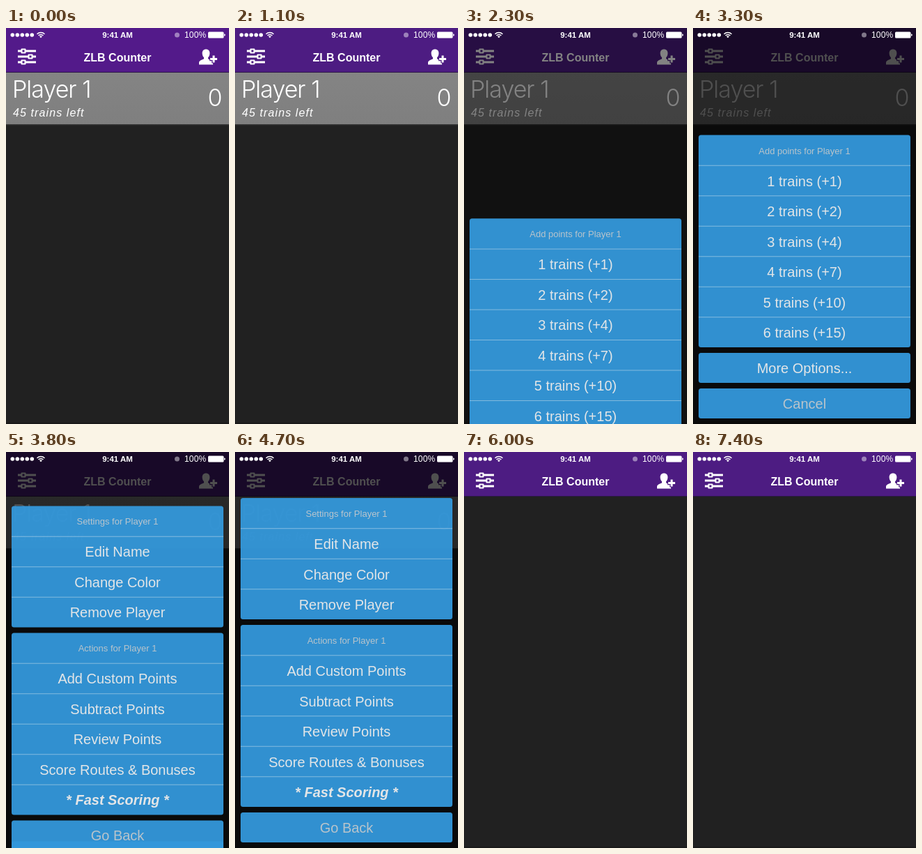
Write an HTML page that moves like this. It is 320x568 px and loops after 7600 ms.

```html
<!DOCTYPE html>
<html lang="en">
<head>
<meta charset="utf-8">
<title>Score counter</title>
<style>
  html, body { margin: 0; width: 100%; height: 100%; overflow: hidden; background: #212121; }
  svg { display: block; width: 320px; height: 568px; }
  text { font-family: "Liberation Sans", Arial, sans-serif; fill: #fff; }
  .mid { text-anchor: middle; }
  .light { font-family: Inter, "Liberation Sans", sans-serif; font-weight: 300; }
</style>
</head>
<body>
<svg viewBox="0 0 320 568" xmlns="http://www.w3.org/2000/svg">
  <defs>
    <linearGradient id="rowFill" x1="0" y1="0" x2="0" y2="1">
      <stop offset="0" stop-color="#848484"/>
      <stop offset="1" stop-color="#7f7f7f"/>
    </linearGradient>
  </defs>
  <rect width="320" height="568" fill="#212121"/>
  <rect y="566" width="320" height="2" fill="#1a1a1a"/>

  <g id="row">
    <rect y="63" width="320" height="75" fill="url(#rowFill)"/>
    <rect y="138" width="320" height="1.5" fill="#363636"/>
    <text class="light" x="9" y="99.5" font-size="34" letter-spacing="-1">Player 1</text>
    <text x="10" y="127" font-size="16" font-style="italic" letter-spacing="1.1">45 trains left</text>
    <text class="light" x="300" y="111.5" font-size="34" text-anchor="middle">0</text>
  </g>

  <rect id="bar" width="320" height="63"/>
  <rect y="63" width="320" height="1" fill="#2c1747"/>
  <g id="sliders" fill="#fff"></g>
  <text class="mid" x="160" y="48" font-size="16" font-weight="700">ZLB Counter</text>
  <g fill="#fff">
    <path d="M287 30.5c3.6 0 5.4 2.4 5.4 5.8 0 2.6-1 4.7-2.4 6v1.9c2.5 1.3 7 2.3 7 5.3v3H277v-3c0-3 4.5-4 7-5.3v-1.9c-1.4-1.3-2.4-3.4-2.4-6 0-3.4 1.8-5.800 5.400-5.800z"/>
    <path id="plusGap" d="M298 38.5v12M292 44.5h12" stroke-width="5.5"/>
    <path d="M298 39.5v10M293 44.5h10" stroke="#fff" stroke-width="3"/>
  </g>

  <rect id="dim" width="320" height="568"/>

  <g id="dots" fill="#fff"></g>
  <g fill="none" stroke="#fff" stroke-width="1.5">
    <path d="M44.5 8.7a7.8 7.8 0 0 1 11 0M46.6 10.9a4.8 4.8 0 0 1 6.8 0"/>
    <path d="M50 14.3l-1.9-2a2.7 2.7 0 0 1 3.8 0z" fill="#fff" stroke="none"/>
  </g>
  <text class="mid" x="160" y="14.2" font-size="11.5" font-weight="700">9:41 AM</text>
  <circle cx="245.5" cy="10" r="3.5" fill="#fff" opacity=".45"/>
  <text x="256" y="14.2" font-size="12" letter-spacing=".2">100%</text>
  <rect x="290" y="5.5" width="22.5" height="9" rx="1.5" fill="#fff"/>
  <rect x="313" y="8.5" width="1.5" height="3" rx=".7" fill="#fff"/>

  <g id="sheets"></g>
</svg>
<script>
const NS = "http://www.w3.org/2000/svg";
const LOOP = 7600, STEP = 100, SLIDE = 400, STAGE = 568;
const HEAD = 44, ROW = 43.5, LINE = .5, GAP = 8;
const PLAIN = "#eef1f3", QUIET = "#c2ced6";
const $ = id => document.getElementById(id);

function add(parent, tag, attrs, content) {
  const el = document.createElementNS(NS, tag);
  for (const k in attrs) el.setAttribute(k, attrs[k]);
  if (content) el.textContent = content;
  parent.appendChild(el);
  return el;
}

function label(parent, str, y, size, color, extra) {
  add(parent, "text", { class: "mid", x: 160, y, "font-size": size, style: `fill:${color}`, ...extra }, str);
}

// Each group: optional title, then its buttons.
function makeSheet(groups) {
  const g = add($("sheets"), "g", { opacity: .95 });
  let y = 0;
  groups.forEach(({ title, items, quiet }) => {
    const h = (title ? HEAD : 0) + items.length * ROW - LINE;
    add(g, "rect", { x: 8, y, width: 304, height: h, rx: 3.5, fill: "#3498db" });
    let top = y;
    if (title) {
      label(g, title, top + 27, 13, QUIET);
      top += HEAD;
    }
    items.forEach((item, i) => {
      if (title || i) add(g, "rect", { x: 8, y: top - .75, width: 304, height: 1, fill: "#fff", opacity: .42 });
      const strong = item[0] === "*" ? { "font-weight": 700, "font-style": "italic" } : {};
      label(g, item, top + 29, 20, quiet ? QUIET : PLAIN, strong);
      top += ROW;
    });
    y += h + GAP;
  });
  return { g, rest: STAGE - y };
}

const points = [1, 2, 4, 7, 10, 15];
const pointSheet = makeSheet([
  { title: "Add points for Player 1", items: points.map((p, i) => `${i + 1} trains (+${p})`) },
  { items: ["More Options..."] },
  { items: ["Cancel"], quiet: true }
]);
const optionSheet = makeSheet([
  { title: "Settings for Player 1", items: ["Edit Name", "Change Color", "Remove Player"] },
  { title: "Actions for Player 1", items: ["Add Custom Points", "Subtract Points", "Review Points",
    "Score Routes & Bonuses", "* Fast Scoring *"] },
  { items: ["Go Back"], quiet: true }
]);

for (let i = 0; i < 5; i++) add($("dots"), "circle", { cx: 9.3 + i * 7, cy: 10, r: 2.8 });

const knobs = [[33, 25], [41, 35], [49, 25]].map(([y, x]) => {
  add($("sliders"), "rect", { x: 17, y: y - 1.5, width: 26, height: 3 });
  add($("sliders"), "rect", { x: x - 3.5, y: y - 3.5, width: 7, height: 7, rx: 1 });
  return add($("sliders"), "rect", { x: x - 1.5, y: y - 1.5, width: 3, height: 3 });
});

const clamp = v => Math.min(1, Math.max(0, v));

// Standard ease-in-out: cubic-bezier(.42, 0, .58, 1)
function ease(x) {
  if (x <= 0 || x >= 1) return clamp(x);
  let lo = 0, hi = 1, s = .5;
  for (let i = 0; i < 24; i++) {
    s = (lo + hi) / 2;
    const u = 1 - s;
    if (1.26 * s * u * u + 1.74 * s * s * u + s * s * s < x) lo = s; else hi = s;
  }
  return s * s * (3 - 2 * s);
}

const slide = (t, start) => ease((t - start) / SLIDE);

function place(sheet, shown) {
  const y = STAGE + (sheet.rest - STAGE) * shown;
  sheet.g.setAttribute("transform", `translate(0 ${y.toFixed(2)})`);
  sheet.g.setAttribute("visibility", shown > 0 ? "visible" : "hidden");
}

function draw(time) {
  const t = Math.floor((time % LOOP) / STEP) * STEP;
  const open = slide(t, 2049), swap = slide(t, 3443), close = slide(t, 5140);
  place(pointSheet, open - swap);
  place(optionSheet, swap - close);
  $("dim").setAttribute("fill-opacity", .69 * (open - slide(t, 5170)));
  $("row").setAttribute("visibility", t < 5200 ? "visible" : "hidden");

  const fade = clamp((t - 300) / 800);
  const mix = (a, b) => Math.round(a + (b - a) * fade);
  const purple = `rgb(${mix(83, 77)},${mix(26, 28)},${mix(138, 130)})`;
  $("bar").setAttribute("fill", purple);
  $("plusGap").setAttribute("stroke", purple);
  knobs.forEach(k => k.setAttribute("fill", purple));
}

const begin = performance.now();
function tick() {
  draw(performance.now() - begin);
  requestAnimationFrame(tick);
}
tick();
</script>
</body>
</html>
```
